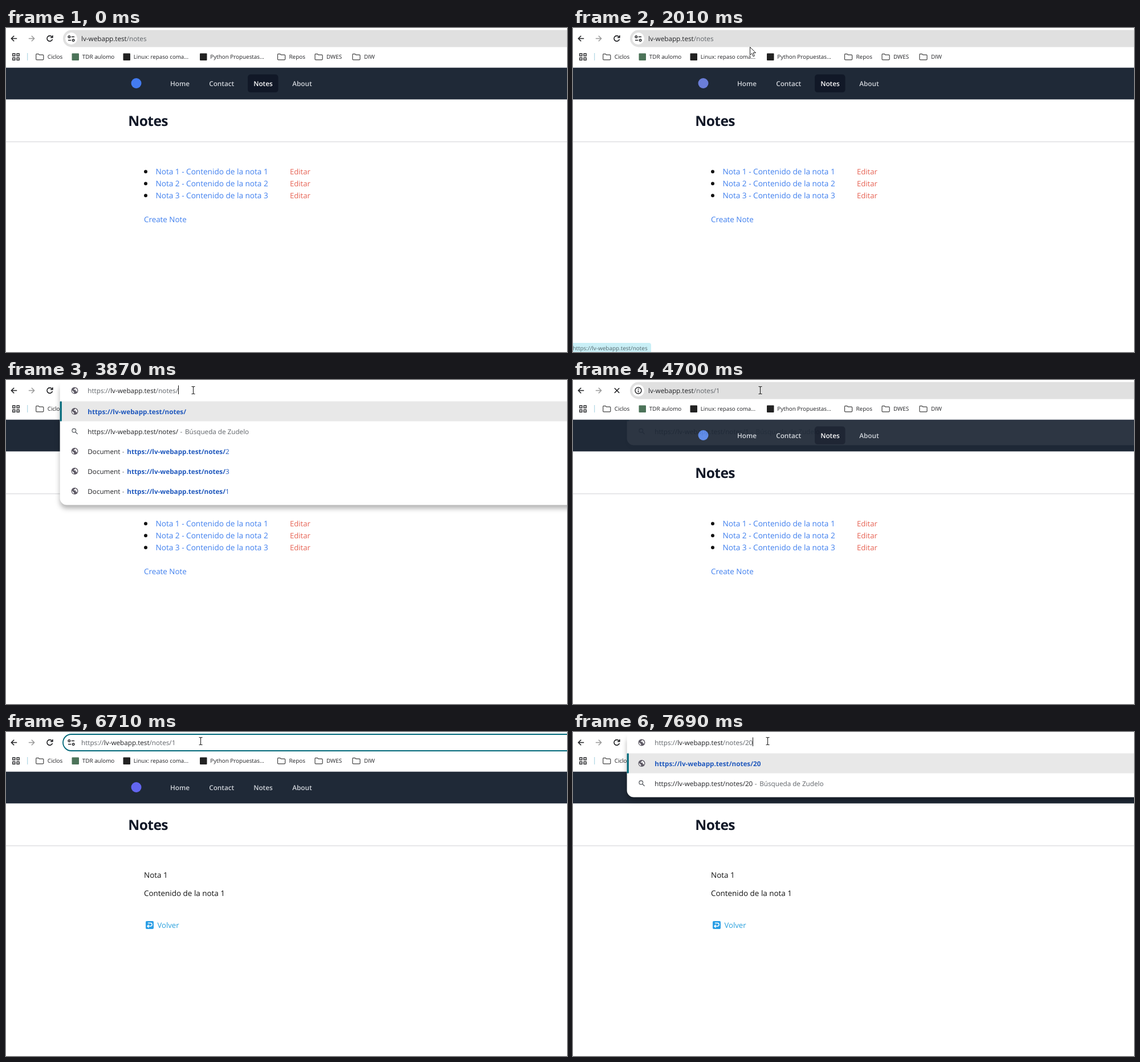
An HTML page that plays this animation: 984 px wide and 569 px high, repeating every 8 s.

```html
<!DOCTYPE html>
<html lang="es">
<head>
<meta charset="utf-8">
<title>Notes</title>
<style>
  html, body { margin: 0; width: 100%; height: 100%; overflow: hidden; background: #fff; }
  svg { display: block; width: 100%; height: 100%; }
  text { font-family: "Open Sans", "Noto Sans", sans-serif; white-space: pre; text-rendering: geometricPrecision; }
  .menu { filter: drop-shadow(0 6px 4px rgba(0, 0, 0, .3)); }
</style>
</head>
<body>
<svg id="stage" viewBox="0 0 984 569" preserveAspectRatio="none"></svg>
<script>
const LOOP = 8000;
const HOST = 'lv-webapp.test';
const INK = '#202124', GRAY = '#5f6368', LINK = '#3f7fee', MATCH = '#1f58bd', TEAL = '#006879';
const URL_SIZE = 11.7, BOOKMARK_SIZE = 9.9, BODY_SIZE = 13.45;
const PAGE_TOP = 69.4, NAV_HEIGHT = 56;
const stage = document.getElementById('stage');
const pen = document.createElement('canvas').getContext('2d');

// Address bar states: start, mode, path after the host, caret or full address shown
const BAR = [
  [0, 'idle', '/notes'],
  [2510, 'select', '/notes', false],
  [2680, 'select', '/notes', true],
  [2850, 'edit', '/notes', true],
  [3350, 'edit', '/notes', false],
  [3870, 'menu', '/notes/', true],
  [4360, 'menu', '/notes/1', true],
  [4700, 'load', '/notes/1'],
  [5030, 'idle', '/notes/1'],
  [5520, 'select', '/notes/1', false],
  [5690, 'select', '/notes/1', true],
  [6040, 'edit', '/notes/1', false],
  [6190, 'edit', '/notes/1', true],
  [6710, 'edit', '/notes/1', false],
  [7030, 'menu', '/notes/', true],
  [7530, 'menu', '/notes/2', true],
  [7690, 'menu', '/notes/20', true]
];

// Pointer: start, shape, x, y
const POINTER = [
  [0, 'none', 0, 0],
  [170, 'arrow', 673, 244],
  [340, 'arrow', 602, 180],
  [500, 'arrow', 500, 122],
  [670, 'hand', 394, 93],
  [840, 'arrow', 367, 67],
  [1010, 'arrow', 410, 86],
  [1170, 'hand', 453, 99],
  [1350, 'hand', 453, 99],
  [1680, 'hand', 446, 96],
  [1850, 'arrow', 374, 68],
  [2010, 'arrow', 310, 33],
  [2170, 'beam', 322.5, 22],
  [2330, 'beam', 328.5, 18],
  [6040, 'beam', 341.5, 16]
];

const LOGO = [[0, '#437bf0'], [1350, '#6b7ed8'], [4700, '#5886e6'], [5030, '#6366f1']];

const at = (track, t) => track.filter(k => k[0] <= t).pop();

const text = (x, y, str, size, fill, weight = 400, extra = '') =>
  `<text x="${x}" y="${y}" font-size="${size}" fill="${fill}" font-weight="${weight}" ${extra}>${str}</text>`;
const rect = (x, y, w, h, fill, r = 0, extra = '') =>
  `<rect x="${x}" y="${y}" width="${w}" height="${h}" rx="${r}" fill="${fill}" ${extra}/>`;
const circle = (x, y, r, fill) => `<circle cx="${x}" cy="${y}" r="${r}" fill="${fill}"/>`;
const line = (d, color, width = 1.5, x = 0, y = 0) =>
  `<path d="${d}" transform="translate(${x} ${y})" fill="none" stroke="${color}" stroke-width="${width}"/>`;

function widthOf(str, size = URL_SIZE) {
  pen.font = `${size}px "Open Sans", "Noto Sans", sans-serif`;
  return pen.measureText(str).width;
}

function pointer([, shape, x, y]) {
  const outline = d => `<path d="${d}" transform="translate(${x} ${y})" fill="#fff" stroke="#222" stroke-width="1" stroke-linejoin="round"/>`;
  if (shape === 'arrow') return outline('M.5.5V14.5L3.8 11.5 6.2 17 8.4 16 6 10.6H10.5Z');
  if (shape === 'hand') return outline('M0 1Q1.3-1 2.6 1V7L9 8.5Q11 9 10.6 11L9.5 17H1.5L-4 10.5Q-3.5 8.5-1.8 9.5L0 11Z');
  if (shape === 'beam') return line('M-3-6.5H-1L0-5.5 1-6.5H3M0-5.5V5.5M-3 6.5H-1L0 5.5 1 6.5H3', '#222', 1.1, x, y);
  return '';
}

const globe = y => circle(120.5, y, 6, '#5f5b66') +
  `<path d="M-4.8-.8L-1.2 2.8V4.8Q-4.7 3.8-4.8-.8M.8-4.8Q.8-2.8-1.5-2.6V-1.2H1.8V1.2H3.2L4 2.6Q6.3-2.2.8-4.8" transform="translate(120.5 ${y})" fill="#fff"/>`;

const lens = y => `<circle cx="119.3" cy="${y - 1.2}" r="3.3" fill="none" stroke="${GRAY}" stroke-width="1.3"/>` +
  line('M1.2 1.2L5 5', GRAY, 1.4, 120.5, y);

function navbar(active, logo) {
  const items = [['Home', 288], ['Contact', 356.2], ['Notes', 434.2], ['About', 502.2]];
  return rect(0, PAGE_TOP, 984, NAV_HEIGHT, '#1f2937') + circle(228.5, 97, 9, logo) +
    (active ? rect(424, 81.6, 53.5, 31.5, '#111827', 5) : '') +
    items.map(([s, x]) => text(x, 101.6, s, 11.75, active && s === 'Notes' ? '#fff' : '#d1d5db', 600)).join('');
}

function noteList() {
  const row = n => {
    const y = 235.5 + 21 * n;
    return circle(245, y - 4.3, 3, '#111') +
      text(262.5, y, `Nota ${n} - Contenido de la nota ${n}`, 13.6, LINK) +
      text(498, y, 'Editar', 13.1, '#e66253');
  };
  return [1, 2, 3].map(row).join('') + text(242, 340.5, 'Create Note', 13.4, LINK);
}

function noteDetail() {
  return text(242, 256.3, 'Nota 1', BODY_SIZE, '#111') +
    text(242, 287.5, 'Contenido de la nota 1', BODY_SIZE, '#111') +
    rect(245, 332, 14, 14, '#2b9fe6', 2) +
    line('M-3-3H1.3A2.5 2.5 0 0 1 1.3 2.5H-3.5M-1.4 0L-4 2.5-1.4 5', '#fff', 1.5, 252, 338.5) +
    text(265.5, 343.8, 'Volver', 13.1, '#269fdd');
}

function page(t) {
  const detail = t >= 4870;
  return navbar(!detail, at(LOGO, t)[1]) +
    text(214.3, 172.4, 'Notes', 24.6, '#111827', 700, 'letter-spacing="-.6"') +
    rect(0, 199, 984, 1, '#dfe0e2') + rect(0, 200, 984, 1, '#f0f0f1') +
    (detail ? noteDetail() : noteList());
}

function bookmarks() {
  const folder = (x, label) =>
    line('M1.5.7H5L6.5 2.2H12.5Q13.8 2.2 13.8 3.5V9.5Q13.8 10.8 12.5 10.8H2Q.7 10.8.7 9.5V2Q.7.7 1.5.7Z', '#444', 1.2, x, 45) +
    text(x + 20.7, 54.3, label, BOOKMARK_SIZE, INK);
  const site = (x, color, label, size) => rect(x, 44.5, 12.5, 12.5, color, 1) +
    text(x + 18.3, 54.3, label, size, INK);
  const grid = [0, 7.3].flatMap(dx => [0, 7.3].map(dy =>
    rect(11.8 + dx, 45 + dy, 4, 4, 'none', 0, `stroke="${INK}" stroke-width="1.4"`))).join('');
  return grid + rect(37, 44, 1.3, 13, '#b5d9e6') + folder(52, 'Ciclos') +
    site(115.5, '#4c7359', 'TDR aulomo', BOOKMARK_SIZE) +
    site(205.5, '#222', 'Linux: repaso coma...', 9.75) +
    site(340, '#222', 'Python Propuestas...', 9.87) +
    folder(475.8, 'Repos') + folder(541.3, 'DWES') + folder(607.2, 'DIW');
}

function address(x, path, full, selected = false) {
  const scheme = full ? 'https://' : '';
  const tint = c => selected ? '#fff' : c;
  const back = selected ? rect(x, 10, widthOf(scheme + HOST + path), 16, '#0b74d1') : '';
  return back + text(x, 22.7,
    `<tspan fill="${tint(GRAY)}">${scheme}</tspan>${HOST}<tspan fill="${tint(GRAY)}">${path}</tspan>`,
    URL_SIZE, tint(INK));
}

const caret = (x, path) =>
  rect(Math.round(x + widthOf('https://' + HOST + path)), 9.5, 1, 15.5, '#111');

function siteIcon(mode) {
  const disc = mode === 'idle' || mode === 'load' ? circle(114.5, 18.5, 10.5, '#fff') : '';
  if (mode === 'load') return disc + line('M-5.5 0A5.5 5.5 0 1 0 5.5 0A5.5 5.5 0 1 0-5.5 0M0-3.2V-1.5M0-.3V3.2', INK, 1.4, 114.5, 18.5);
  return disc + line('M-5.5-3A1.8 1.8 0 1 0-1.9-3A1.8 1.8 0 1 0-5.5-3M.2-3H5.5M1.9 3A1.8 1.8 0 1 0 5.5 3A1.8 1.8 0 1 0 1.9 3M-5.5 3H-.2', INK, 1.4, 114.5, 18.5);
}

function toolbar([, mode, path, flag]) {
  const focused = mode === 'select' || mode === 'edit';
  const arrow = 'M5.2 0H-4.5M.2-4.8L-4.6 0 .2 4.8';
  const reload = mode === 'load'
    ? line('M-4.2-4.2L4.2 4.2M4.2-4.2L-4.2 4.2', INK, 1.6, 77, 18.5)
    : line('M4.6 1.2A4.8 4.8 0 1 1 3.6-3.2L4.7-2M5-5.5V-1.7H1.2', INK, 1.6, 76.8, 18.5);
  const pill = focused
    ? rect(100, 4, 920, 29, '#fff', 14.5, `stroke="${TEAL}" stroke-width="1.8"`)
    : rect(100, 3.5, 920, 30, '#e0e0e0', 15);
  const url = mode === 'menu' ? '' :
    address(132, path, mode === 'edit' || (mode === 'select' && flag), mode === 'select');
  return rect(0, 0, 984, PAGE_TOP, '#fff') + rect(0, PAGE_TOP - 1, 984, 1, '#e0e3e6') +
    line(arrow, INK, 1.6, 14, 18.5) +
    `<g transform="translate(45 18.5) scale(-1 1)">${line(arrow, '#999', 1.5)}</g>` +
    reload + bookmarks() + pill + siteIcon(mode) + url +
    (mode === 'edit' && flag ? caret(132, path) : '');
}

function menu(path) {
  const full = 'https://' + HOST + path, base = `https://${HOST}/notes/`;
  const tail = path.slice('/notes/'.length);
  const rows = tail ? 2 : 5;
  const visited = tail.length === 1;
  const left = 94.6;
  const label = (x, y, s, color, weight) => text(x, y + 4.5, s, URL_SIZE, color, weight);
  const entry = (y, url) => globe(y) + label(143.3, y, 'Document', INK) +
    label(203.8, y, '-', GRAY) + label(212.3, y, url, MATCH, 700);
  const end = 143.3 + widthOf(full);
  const first = visited ? entry(55, full) : globe(55) + label(143.3, 55, full, MATCH, 700);
  const history = tail ? '' : [2, 3, 1].map((n, i) =>
    entry(125 + 35 * i, `${base}<tspan font-weight="400">${n}</tspan>`)).join('');
  return `<g class="menu">${rect(left, 2, 960, rows * 35 + 42.5, '#fff', 12)}</g>` +
    rect(left, 0, 984, 14, '#fff') +
    rect(97, 37.5, 887, 35, '#e8e8e8') + rect(left, 37.5, 3.2, 35, TEAL, 1) +
    globe(18.5) + address(143.3, path, true) + caret(143.3, path) +
    first + lens(90) + label(143.3, 90, full, INK) + label(end + 3.5, 90, '-', GRAY) +
    label(end + 12, 90, 'Búsqueda de Zudelo', GRAY) + history;
}

const status = () => rect(-6, 553, 143, 24, '#c9eff6', 4) +
  text(-.6, 566.4, `https://${HOST}/notes`, 9.95, '#52666c');

function scene(t) {
  const bar = at(BAR, t), mode = bar[1];
  // The closing menu leaves a faint trace over the page only
  const trace = t >= 4700 && t < 4870 ? `<g opacity=".06">${menu(bar[2])}</g>` : '';
  return page(t) + trace + toolbar(bar) +
    (mode === 'menu' ? menu(bar[2]) : '') +
    (t >= 1350 && t < 2330 ? status() : '') +
    pointer(at(POINTER, t));
}

let shown = '';
function frame(now) {
  const next = scene(now % LOOP);
  if (next !== shown) stage.innerHTML = shown = next;
  requestAnimationFrame(frame);
}
frame(0);
</script>
</body>
</html>
```
